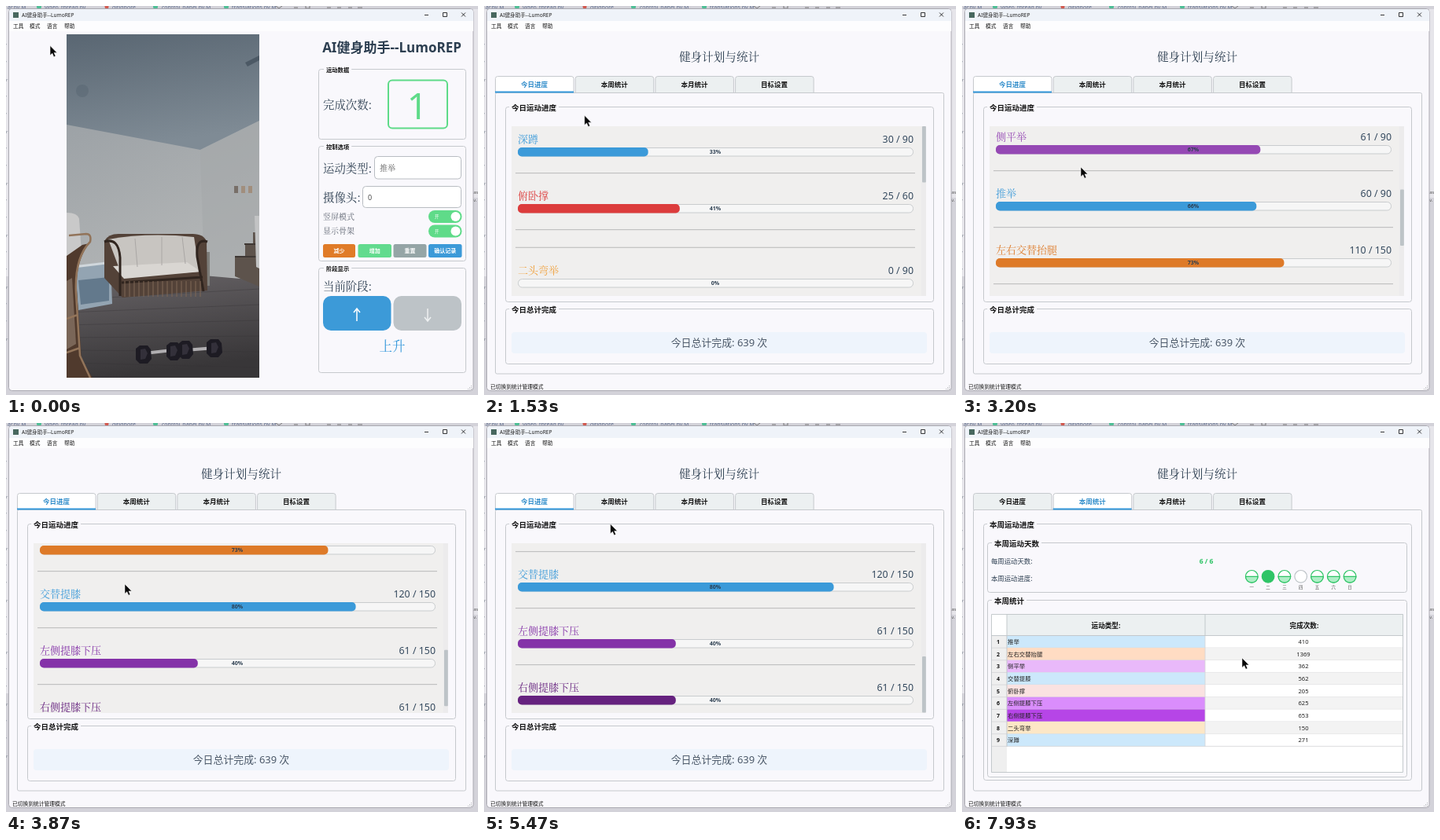
Animation, 600 px wide and 495 px high, one loop 8000 ms. Source, as an HTML page:

```html
<!DOCTYPE html>
<html lang="zh-CN">
<head>
<meta charset="utf-8">
<style>
html, body { margin: 0; width: 100%; height: 100%; overflow: hidden; background: #d3d2d9; }
svg { display: block; width: 600px; height: 495px; font-family: "Noto Sans", "Noto Sans CJK SC", "Noto Sans CJK", sans-serif; }
text { white-space: pre; }
.serif { font-family: "Noto Serif CJK SC", "Noto Sans CJK SC", "Noto Sans CJK", serif; }
</style>
</head>
<body>
<svg id="stage" viewBox="0 0 600 495"></svg>
<script>
const stage = document.getElementById('stage');
const INK = '#2c3e50', BLUE = '#3498db', GREEN = '#2fc466', EDGE = '#c6c9cd', PAGE = '#f9f8fc';
const APP = 'AI健身助手--LumoREP';

function el(parent, tag, attrs = {}, content) {
  const node = document.createElementNS('http://www.w3.org/2000/svg', tag);
  for (const key in attrs) node.setAttribute(key, attrs[key]);
  if (content !== undefined) node.textContent = content;
  parent.appendChild(node);
  return node;
}
const group = (p, attrs) => el(p, 'g', attrs);
const rect = (p, x, y, width, height, fill, attrs) => el(p, 'rect', { x, y, width, height, fill, ...attrs });
const path = (p, d, fill, attrs) => el(p, 'path', { d, fill, ...attrs });
const stroke = (p, d, color, width = 1, attrs) => path(p, d, 'none', { stroke: color, 'stroke-width': width, ...attrs });
const circle = (p, cx, cy, r, fill, attrs) => el(p, 'circle', { cx, cy, r, fill, ...attrs });
const text = (p, x, y, str, size, fill = INK, attrs) => el(p, 'text', { x, y, 'font-size': size, fill, ...attrs }, str);
const BOLD = { 'font-weight': 700 };
const MID = { 'text-anchor': 'middle' };
const SERIF = { class: 'serif', 'font-weight': 500 };

const defs = el(stage, 'defs');
function gradient(id, from, to) {
  const g = el(defs, 'linearGradient', { id, x2: 0.25, y2: 1 });
  el(g, 'stop', { 'stop-color': from });
  el(g, 'stop', { offset: 1, 'stop-color': to });
  return `url(#${id})`;
}
function clip(id, ...box) {
  rect(el(defs, 'clipPath', { id }), ...box);
  return { 'clip-path': `url(#${id})` };
}

function groupBox(p, x, y, w, h, title, size, inset) {
  rect(p, x + .5, y + .5, w - 1, h - 1, 'none', { stroke: EDGE, rx: 3 });
  rect(p, x + inset - 3, y - 2, title.length * size + 6, 5, PAGE);
  text(p, x + inset, y + size * .37 + 1, title, size, '#111', BOLD);
}

function drawWindow() {
  rect(stage, 0, 0, 600, 495, '#d3d2d9');
  rect(stage, 0, 4, 4, 340, '#e6e5ea');
  rect(stage, 594, 4, 6, 240, '#e6e5ea');
  [['ar.py M', 2], ['video_thread.py', 49], ['.gitignore', 133], ['control_panel.py M', 198], ['translations.py M', 287]]
    .forEach(([name, x]) => text(stage, x, 4, name, 7, '#5d6c8c'));
  [42, 190, 280].forEach(x => circle(stage, x, 1, 3, '#4fbf96'));
  circle(stage, 128, 1, 2.5, '#d25a50');
  stroke(stage, 'M343 0l4 3l4-3M366 2h5M381 0v3h5v-3M408 2h5M421 2h5M435 2h5M447 2h6', '#777');
  for (let y = 52; y < 440; y += 22) text(stage, 0, y, y % 3 ? "'" : 'r', 6, '#77808d');
  text(stage, 594, 239, 'as', 6, '#555');
  text(stage, 594, 249, 'v.', 6, '#555');

  rect(stage, 3.5, 3.5, 590.5, 486, PAGE, { rx: 4, stroke: '#aaa9b1' });
  path(stage, 'M4 19V8q0-4 4-4h582q4 0 4 4v11z', '#eff3f9');
  rect(stage, 4, 19, 590, 13, '#fdfdfe');
  rect(stage, 9, 8, 7, 7, '#48685f');
  text(stage, 20, 14, APP, 6.6, '#222');
  stroke(stage, 'M532 11.5h5M555.5 8.5h5v5h-5zM579 8.5l5 5m0-5l-5 5', '#222', .9);
  ['工具', '模式', '语言', '帮助'].forEach((s, i) => text(stage, [9, 30, 52, 74][i], 28, s, 6.7, '#111'));
  for (let i = 0; i < 3; i++) for (let j = 0; j <= i; j++) rect(stage, 591 - j * 2, 483 + i * 2, 1, 1, '#b5b5b9');
}

function drawRoom(p) {
  const g = group(p, clip('photo', 77, 36, 245, 437));
  rect(g, 77, 36, 245, 437, gradient('wall', '#92999f', '#bcbdbc'));
  path(g, 'M77 36H322V146L247 183L77 151z', gradient('ceiling', '#596672', '#7f8b95'));
  path(g, 'M247 183L322 146V345H252z', '#a5a9ab', { opacity: .6 });
  path(g, 'M304 72l18-9v6l-15 8z', '#4c5965');
  circle(g, 97, 108, 8, '#586571', { opacity: .5 });
  path(g, 'M77 352L252 343L322 349V473H77z', gradient('floor', '#686467', '#383638'));
  for (let i = 0; i < 7; i++) stroke(g, `M77 ${374 + i * 16}L322 ${360 + i * 20}`, '#343235', .7, { opacity: .5 });
  [290, 299, 308].forEach((x, i) => rect(g, x, 229, 5, 9, i ? '#a18e7d' : '#786f68'));
  path(g, 'M322 288h-8v14h-10v16h-13v26l31 13z', '#5d534c');
  stroke(g, 'M291 319h31M303 303h19', '#3f3834', 2);
  path(g, 'M316 267h6v67l-4-2z', '#c2c3c4');
  path(g, 'M251 313h8v43h-8z', '#7d7d79');

  path(g, 'M88 331l45-6l2 54l-43 8z', '#93a4b2');
  path(g, 'M92 349l39-4v30l-36 5z', '#63798c');
  stroke(g, 'M86 332l50-6', '#d0d7dc', 3);
  path(g, 'M125 299q5-9 18-9h94q15 0 18 10l1 62l-108 9l-23-25z', '#534238');
  path(g, 'M130 297q50-9 109-3l7 44l-98 7z', '#c8c5c1');
  path(g, 'M136 331l94-5l18 12l-98 9z', '#d9d6d2');
  stroke(g, 'M164 296l3 36M198 294v36M224 294l4 34', '#aaa7a5', 1);
  stroke(g, 'M125 300q18-6 20 20v49M256 300q-15-5-13 19l8 44M147 352l103-7', '#30251f', 3);
  for (let x = 151; x < 250; x += 6) stroke(g, `M${x} 350v20`, '#806857', 1);

  path(g, 'M77 263q14 0 16 8l3 43l-19 16z', '#c9c9c9');
  path(g, 'M77 318l20-14l9-2q-18 22-16 61l6 86l14 24H77z', '#503a2d');
  path(g, 'M77 350l7-4l5 84l-12 7z', '#7a6658');
  stroke(g, 'M80 292l22-2q7 0 5 10q-20 20-18 65l5 80l13 28M77 398l14-5M77 441l17-6', '#92745a', 2.5);

  stroke(g, 'M176 442l35-4M228 438l37-3', '#b0aeb1', 4);
  [[175, 443, 10], [213, 439, 9], [228, 437, 9], [265, 435, 10]].forEach(([x, y, r]) => {
    path(g, `M${x - r} ${y - 7}l5-4h${r}l4 5l1 12l-5 6h-${r}l-5-5z`, '#1d1b23');
    path(g, `M${x - 4} ${y - 6}l6-1l3 6l-3 7l-6 1z`, '#33303a');
  });
}

function drawTraining(p) {
  drawRoom(p);
  text(p, 490.5, 59, APP, 17, INK, { ...BOLD, ...MID });
  groupBox(p, 397, 80, 188, 90, '运动数据', 7.3, 10);
  groupBox(p, 397, 178, 188, 147, '控制选项', 7.3, 10);
  groupBox(p, 397, 333, 188, 134, '阶段显示', 7.3, 10);
  [['完成次数:', 131], ['运动类型:', 212], ['摄像头:', 249], ['当前阶段:', 362]]
    .forEach(([s, y]) => text(p, 403, y, s, 14.4, INK, SERIF));

  rect(p, 486, 94.5, 75, 61, PAGE, { stroke: '#5fdb89', 'stroke-width': 2, rx: 5 });
  text(p, 523, 144, '1', 46, '#5fdb89', MID);
  rect(p, 468.5, 191.5, 110, 28.5, '#fff', { stroke: '#b9bdc2', rx: 4 });
  text(p, 475, 210, '推举', 10, '#555', SERIF);
  rect(p, 453.5, 229.5, 125, 27, '#fff', { stroke: '#b9bdc2', rx: 4 });
  text(p, 460, 246.5, '0', 9, '#444');

  [['竖屏模式', 268], ['显示骨架', 286.5]].forEach(([s, y]) => {
    text(p, 403, y + 3.5, s, 10, '#5d6470', { class: 'serif' });
    rect(p, 537, y - 8, 42.5, 16, '#5fdb89', { rx: 8 });
    circle(p, 571.5, y, 6, '#fff');
    text(p, 545, y + 2, '开', 5.5, '#fff');
  });
  [['减少', 403, 41, '#e07b28'], ['增加', 447.5, 42.5, '#62db8e'], ['重置', 492.5, 42, '#95a5a6'], ['确认记录', 537, 42.5, '#3c9ad8']]
    .forEach(([s, x, w, color]) => {
      rect(p, x, 303, w, 17, color, { rx: 2.5 });
      text(p, x + w / 2, 314.3, s, 7, '#fff', { ...BOLD, ...MID });
    });
  rect(p, 403, 369, 86.5, 44, '#3c9ad8', { rx: 10 });
  rect(p, 492.5, 369, 86.5, 44, '#bdc3c7', { rx: 10 });
  stroke(p, 'M446 401v-16m-4 5l4-5l4 5', '#fff', 1.5);
  stroke(p, 'M536 385v16m-4-5l4 5l4-5', '#eef0f1', 1.5);
  text(p, 491, 439, '上升', 16.5, BLUE, { ...SERIF, ...MID });
}

function drawTabs(p, active) {
  text(p, 299, 69.5, '健身计划与统计', 14.6, INK, { ...SERIF, ...MID });
  rect(p, 14.5, 110.5, 570, 357.5, PAGE, { stroke: EDGE, rx: 2 });
  ['今日进度', '本周统计', '本月统计', '目标设置'].forEach((s, i) => {
    const x = 14 + i * 101.7, on = i === active;
    path(p, `M${x + .5} 110.5V92.5q0-3 3-3h93.5q3 0 3 3v18z`, on ? '#fff' : '#ecf0f1', { stroke: EDGE });
    if (on) rect(p, x, 108.5, 100, 2, BLUE);
    text(p, x + 50, 103.3, s, 8.5, on ? '#2f8cca' : '#111', { ...BOLD, ...MID });
  });
  text(p, 8, 486.7, '已切换到统计管理模式', 6.75, '#111');
}

const exercises = [
  ['深蹲', 30, 90, '#3b9ad9'], ['俯卧撑', 25, 60, '#dc3c3c'], ['二头弯举', 0, 90, '#f0a03c'],
  ['侧平举', 61, 90, '#9548b4'], ['推举', 60, 90, '#3b9ad9'], ['左右交替抬腿', 110, 150, '#de7a28'],
  ['交替提膝', 120, 150, '#3b9ad9'], ['左侧提膝下压', 61, 150, '#8432a8'], ['右侧提膝下压', 61, 150, '#66227f'],
];

function drawToday(p) {
  drawTabs(p, 0);
  groupBox(p, 27, 128, 545, 249, '今日运动进度', 9.5, 8);
  groupBox(p, 27, 385, 545, 71, '今日总计完成', 9.5, 8);
  rect(p, 35, 415, 528, 27, '#eef4fc', { rx: 4 });
  text(p, 299, 433, '今日总计完成: 639 次', 12.9, '#4b5868', { ...MID });

  rect(p, 35, 153, 527, 216, '#f0efee');
  const list = group(group(p, clip('list', 35, 153, 521, 216)));
  list.parentNode.setAttribute('clip-path', 'url(#list)');
  const separator = y => rect(list, 40, y, 508, 1.2, '#c1c1c1');
  exercises.forEach(([name, done, goal, color], i) => {
    const y = 169 + i * 72 + (i > 1 ? 23 : 0);
    const share = Math.floor(done / goal * 100);
    text(list, 43, y + 5, name, 13, color, SERIF);
    text(list, 546, y + 4.8, `${done} / ${goal}`, 12.4, '#34495e', { 'text-anchor': 'end' });
    rect(list, 43.5, y + 11.5, 502, 10.5, '#f6f6f6', { stroke: '#c9ccce', rx: 5 });
    if (share) rect(list, 43, y + 11, 502 * share / 100, 11.5, color, { rx: 5 });
    text(list, 294, y + 19.4, share + '%', 7, INK, { ...BOLD, ...MID });
    separator(y + 43);
  });
  separator(306.7);
  rect(p, 556, 153, 6, 216, '#ecebec');
  const thumb = rect(p, 557, 153, 4.8, 71.5, '#bdc3c7', { rx: 1 });
  return { list, thumb };
}

function drawWeek(p) {
  drawTabs(p, 1);
  groupBox(p, 27, 128, 545, 327, '本周运动进度', 9.5, 8);
  groupBox(p, 32, 152, 534, 64, '本周运动天数', 9.5, 9);
  groupBox(p, 32, 225, 534, 226, '本周统计', 9.5, 9);
  text(p, 37, 179, '每周运动天数:', 8.4, INK, { 'font-weight': 500 });
  text(p, 37, 201, '本周运动进度:', 8.4, INK, { 'font-weight': 500 });
  text(p, 310.5, 179, '6 / 6', 8.5, GREEN, { ...BOLD, ...MID });
  [...'一二三四五六日'].forEach((day, i) => {
    const x = 368.3 + i * 20.8, full = i === 1, empty = i === 3;
    circle(p, x, 195.3, 7.8, full ? GREEN : '#fff', { stroke: empty ? '#bdc3c7' : GREEN, 'stroke-width': 1.2 });
    if (!full && !empty) path(p, `M${x - 7.8} 195.3a7.8 7.8 0 0 0 15.6 0z`, '#aeeec6', { stroke: GREEN, 'stroke-width': 1.2 });
    text(p, x, 210.5, day, 5.5, '#555', MID);
  });

  rect(p, 37, 243, 524, 202, '#fff');
  rect(p, 37, 270, 20, 175, '#efefef');
  rect(p, 57, 243, 504, 27.5, '#ecf0f1');
  text(p, 183, 260.5, '运动类型:', 8.6, '#111', { ...BOLD, ...MID });
  text(p, 435, 260.5, '完成次数:', 8.6, '#111', { ...BOLD, ...MID });
  [['推举', 410, '#cce8fb'], ['左右交替抬腿', 1369, '#ffdcc3'], ['侧平举', 362, '#e9b9fa'],
   ['交替提膝', 562, '#cce8fb'], ['俯卧撑', 205, '#fae2e1'], ['左侧提膝下压', 625, '#da8dfc'],
   ['右侧提膝下压', 653, '#b645e7'], ['二头弯举', 150, '#fde7c6'], ['深蹲', 271, '#cce8fb']]
    .forEach(([name, count, color], i) => {
      const y = 270.5 + i * 15.65;
      rect(p, 57, y, 252, 15.65, color);
      rect(p, 309, y, 252, 15.65, i % 2 ? '#f3f3f3' : '#fff');
      text(p, 46, y + 10.5, i + 1, 7, '#111', { ...BOLD, ...MID });
      text(p, 58, y + 10.5, name, 7.4, '#222');
      text(p, 434, y + 10.6, count, 7.6, '#222', MID);
      stroke(p, `M37 ${y + 15.65}H561`, '#d4d4d6', .8);
    });
  stroke(p, 'M309 270V411.5', '#d4d4d6', .8);
  stroke(p, 'M37.5 243.5H560.5V444.5H37.5zM57 243V411.5M309 243V270.5M37 270.5H561', '#bfc4c8', .9);
}

drawWindow();
const pages = [0, 1, 2].map(() => group(stage));
drawTraining(pages[0]);
const { list, thumb } = drawToday(pages[1]);
drawWeek(pages[2]);
const cursor = path(stage, 'M0 0V12.2L2.8 9.7L4.8 14.2L6.9 13.3L5 8.9H8.8z', '#080808', { stroke: '#fff', 'stroke-width': .5 });

// Tables of [time, values...]
const scrollTrack = [[2210, 0], [2730, 125], [3870, 407], [3970, 432]];
const cursorTrack = [
  [0, 56, 50.5], [70, 60, 54], [270, 74, 66], [1100, 108, 118], [1930, 146, 159], [2150, 151, 205],
  [5100, 151, 205], [5600, 164, 102], [5850, 165, 101], [6400, 412, 199.5],
  [7050, 386, 385], [7200, 376, 375], [7800, 356, 299],
];

function sample(track, t) {
  const next = track.findIndex(step => step[0] > t);
  if (next === 0) return track[0].slice(1);
  if (next < 0) return track[track.length - 1].slice(1);
  const a = track[next - 1], b = track[next], k = (t - a[0]) / (b[0] - a[0]);
  return a.slice(1).map((v, i) => v + (b[i + 1] - v) * k);
}

function render(now) {
  const t = now % 8000;
  const current = t < 270 ? 0 : t < 5800 ? 1 : 2;
  pages.forEach((page, i) => page.style.display = i === current ? '' : 'none');
  const [offset] = sample(scrollTrack, t);
  list.setAttribute('transform', `translate(0 ${-Math.round(offset)})`);
  thumb.setAttribute('y', 153 + offset / 3);
  cursor.setAttribute('transform', `translate(${sample(cursorTrack, t).join(' ')})`);
}

const start = performance.now();
function tick() {
  render(performance.now() - start);
  requestAnimationFrame(tick);
}
tick();
</script>
</body>
</html>
```
